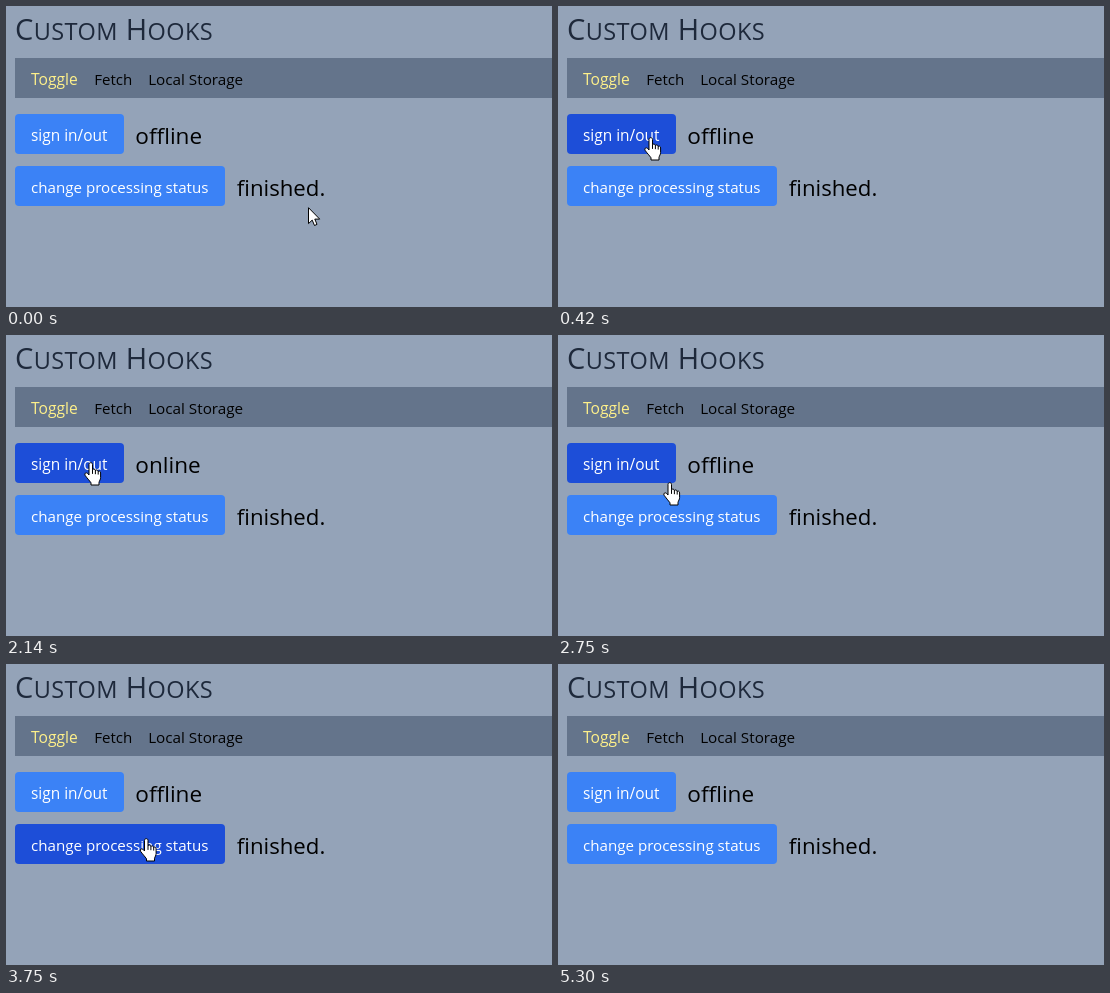
Recreate the animation shown at these times as an HTML page. Size 546 by 301 pixels, loop 5.85 s.

```html
<!DOCTYPE html>
<html lang="en">
<head>
<meta charset="utf-8">
<title>Custom Hooks</title>
<style>
  html, body { margin: 0; width: 100%; height: 100%; overflow: hidden; background: #94a3b8; }
  svg { display: block; width: 100%; height: 100%; }
  text {
    font-family: "Open Sans", "Noto Sans", sans-serif;
    font-variant-ligatures: none;
    white-space: pre;
  }
  .title { font-size: 29px; letter-spacing: .4px; fill: #1e293b; }
  .title .small { font-size: 23.5px; }
  .label { fill: #fff; }
  .cursor path { fill: #fff; stroke: #000; stroke-linejoin: round; }
  .cursor .crease { fill: none; stroke-linecap: round; }
</style>
</head>
<body>
<svg viewBox="0 0 546 301">
  <rect width="546" height="301" fill="#94a3b8"/>
  <text class="title" x="9" y="34">C<tspan class="small">USTOM</tspan> H<tspan class="small">OOKS</tspan></text>

  <rect x="9" y="52" width="537" height="40" fill="#64748b"/>
  <text x="25" y="79" font-size="15.6" fill="#fef08a">Toggle</text>
  <text x="88.2" y="79" font-size="15.1">Fetch</text>
  <text x="142.2" y="79" font-size="15.25">Local Storage</text>

  <rect id="signButton" x="9" y="108" width="109" height="40" rx="4"/>
  <text class="label" x="25" y="135" font-size="15.43">sign in/out</text>
  <text id="signText" x="129.3" y="138" font-size="22.55"></text>

  <rect id="workButton" x="9" y="160" width="210" height="40" rx="4"/>
  <text class="label" x="25" y="187" font-size="15.13">change processing status</text>
  <text id="workText" x="230.8" y="190" font-size="22.2"></text>

  <g id="arrow" class="cursor">
    <path d="M.5 .7V16.6L4.2 13.1L6.5 18.5L9 17.4L6.8 12.1H11.7Z"/>
  </g>
  <g id="hand" class="cursor">
    <path d="M5 2.4C5 .1 8.5 .1 8.5 2.4V7.8C9 6.7 11.2 6.8 11.4 8.5C12 7.5 14 7.8 14.2 9.4C15 8.7 16.6 9.1 16.6 10.9V15.5C16.6 17.5 15.4 18.8 15 20.3V23H7V20.8C5.5 18.6 2.7 15.7 1 13.2C.1 11.5 2 10 3.5 11.3L5 13Z"/>
    <path class="crease" d="M8.5 8V11.5M11.4 8.6V11.8M14.2 9.5V12.2"/>
  </g>
</svg>
<script>
  const LOOP = 5850;
  const el = id => document.getElementById(id);

  // Pointer steps: start time, shape, x, y, hovered button
  const pointer = [
    [0, "arrow", 302, 201, ""],
    [150, "hand", 183, 173, "work"],
    [270, "hand", 98, 138, ""],
    [420, "hand", 86, 131, "sign"],
    [580, "hand", 79, 128, "sign"],
    [730, "hand", 78, 127, "sign"],
    [2750, "hand", 105, 147, "sign"],
    [2890, "hand", 133.5, 174, "work"],
    [4760, "hand", 143, 190, "work"],
    [4910, "arrow", 180, 220, ""],
    [5030, "arrow", 219, 252, ""],
    [5180, "arrow", 470, 286, ""],
    [5300, "", 0, 0, ""]
  ];
  const signClicks = [1010, 1570, 2140, 2750];
  const workClicks = [3320, 3750, 4210, 4640];

  const toggled = (clicks, t) => clicks.filter(c => c <= t).length % 2 === 1;

  function setText(id, value) {
    if (el(id).textContent !== value) el(id).textContent = value;
  }

  function draw(t) {
    const [, shape, x, y, hover] = pointer.filter(p => p[0] <= t).pop();
    for (const id of ["arrow", "hand"]) {
      el(id).setAttribute("visibility", id === shape ? "visible" : "hidden");
      el(id).setAttribute("transform", `translate(${x} ${y})`);
    }
    for (const name of ["sign", "work"]) {
      el(name + "Button").setAttribute("fill", hover === name ? "#1d4ed8" : "#3b82f6");
    }
    setText("signText", toggled(signClicks, t) ? "online" : "offline");
    setText("workText", toggled(workClicks, t) ? "processing..." : "finished.");
  }

  const start = performance.now();
  function tick() {
    draw((performance.now() - start) % LOOP);
    requestAnimationFrame(tick);
  }
  tick();
</script>
</body>
</html>
```
